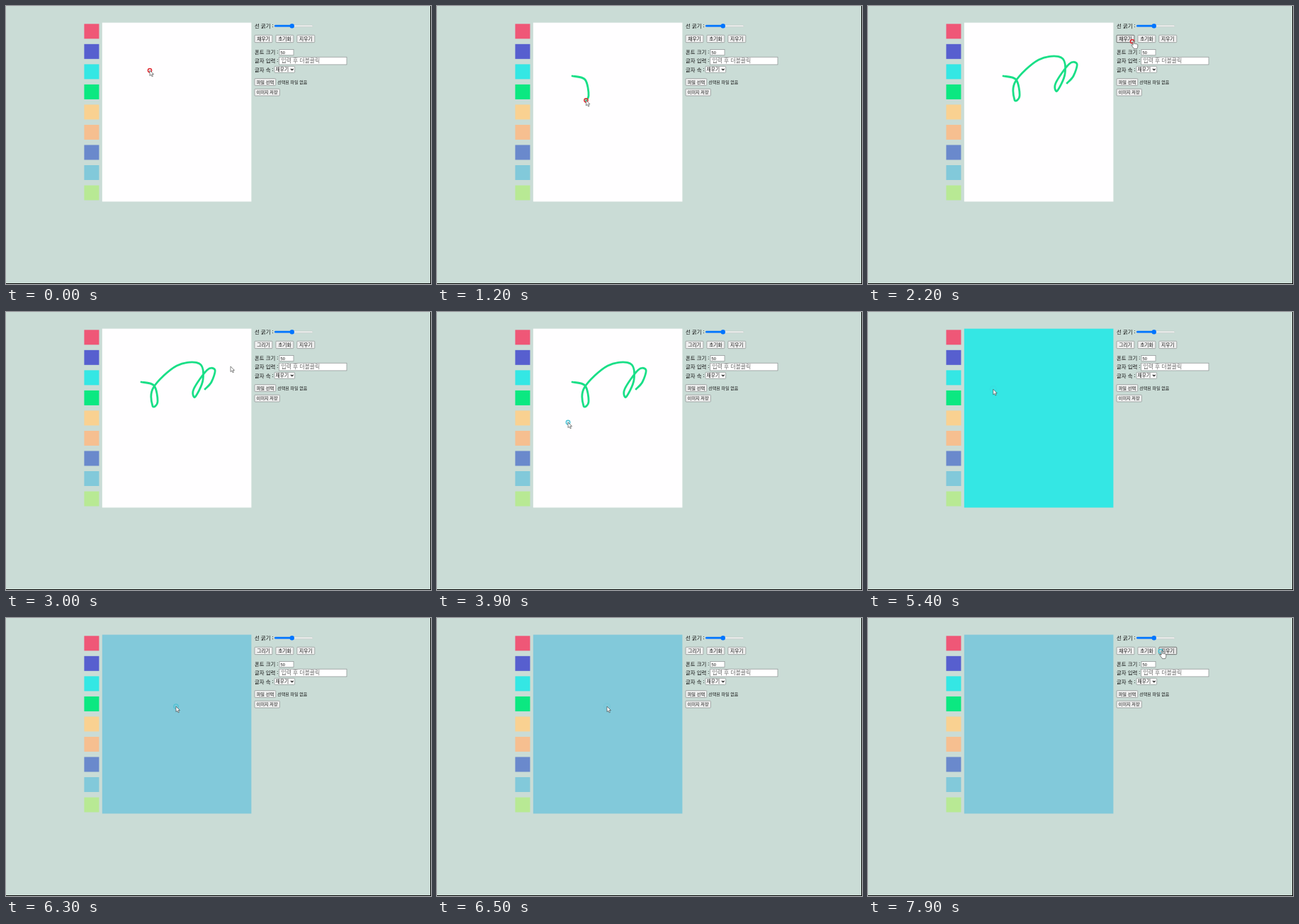
An HTML page for the animation above (8000 ms loop, 600 by 393 pixels).

```html
<!DOCTYPE html>
<html lang="ko">
<meta charset="utf-8">
<title>그림판</title>
<style>
html, body { margin: 0; width: 100%; height: 100%; overflow: hidden; background: #000 }
svg { display: block; width: 600px; height: 393px }
text { font-family: "Noto Sans CJK KR", "Noto Sans CJK", sans-serif; font-weight: 300; fill: #111; white-space: pre }
.box { fill: #fff; stroke: #8b9090; stroke-width: .7 }
.button { fill: #efefef; stroke: #8b9090; stroke-width: .7 }
.button.hover { fill: #e6e6e6; stroke: #444 }
.cursor { fill: #fff; stroke: #333; stroke-width: .6; stroke-linejoin: round }
</style>
<svg id="stage" viewBox="0 0 600 393">
  <rect width="599" height="392" fill="#cadcd6"/>
  <rect id="paper" x="135.8" y="23.6" width="210.6" height="252.9"/>
  <path id="line" fill="none" stroke="#19df87" stroke-width="2.8" stroke-linecap="round"/>
  <g id="ui"></g>
  <circle id="ring"/>
  <g id="pointer">
    <path id="arrow" class="cursor" d="M0 0V7.6L1.8 6L3.1 8.8L4.4 8.2L3.2 5.5H5.5Z"/>
    <path id="hand" class="cursor" d="M1.1 0C1.1-1.3 2.8-1.3 2.8 0V3.4C3.4 2.8 4.2 3 4.4 3.6C5.2 3.2 6 3.4 6.2 4.1C7 3.7 7.8 4.2 7.8 5.1V7.2C7.8 8.9 6.9 9.3 6.8 10.4H2.4C2 8.9-.3 7.2-.8 5.6C-1 4.6 0 4.3 1.1 5.4Z"/>
  </g>
</svg>
<script>
const $ = id => document.getElementById(id);

function add(tag, attrs, content = '') {
  const el = document.createElementNS('http://www.w3.org/2000/svg', tag);
  for (const key in attrs) el.setAttribute(key, attrs[key]);
  el.textContent = content;
  return $('ui').appendChild(el);
}
const rect = (x, y, width, height, attrs) => add('rect', { x, y, width, height, ...attrs });
const label = (x, y, size, content, attrs) => add('text', { x, y, 'font-size': size, ...attrs }, content);

function button(x, y, width, height, size, content) {
  const box = rect(x, y, width, height, { class: 'button', rx: 1 });
  const text = label(x + width / 2, y + height / 2 + size * .36, size, content, { 'text-anchor': 'middle' });
  return { x, width, box, text };
}

// Palette
const colors = ['#ef5777', '#575fcf', '#34e7e4', '#0be881', '#f9d191', '#f6bf90', '#6a89cc', '#82c9da', '#b8e994'];
const swatchSize = 21, swatchLeft = 110.4, swatchTop = 25.3, swatchStep = 28.53;
colors.forEach((fill, i) => rect(swatchLeft, swatchTop + i * swatchStep, swatchSize, swatchSize, { fill }));

// Controls
const left = 351;
['선 굵기 :', '폰트 크기 :', '글자 입력 :', '글자 속 :'].forEach((name, i) =>
  label(left, i ? 55.3 + i * 12.4 : 31, 7.4, name));
rect(379, 27, 54, 2.4, { rx: 1.2, fill: '#efefef', stroke: '#b4bcb9', 'stroke-width': .4 });
rect(379, 26.8, 25, 2.8, { rx: 1.4, fill: '#0075ff' });
add('circle', { cx: 403.8, cy: 28.2, r: 3.2, fill: '#0075ff' });
const tools = ['채우기', '초기화', '지우기'].map((name, i) => button(left + i * 29.9, 41.2, 25, 10.4, 6.7, name));
rect(386, 61.6, 20, 8, { class: 'box' });
label(387.5, 67.8, 5.8, '50', { style: 'font-family: "Liberation Sans", sans-serif' });
rect(385.7, 72.2, 95.3, 10.7, { class: 'box' });
label(388.6, 80.4, 7.8, '입력 후 더블클릭', { style: 'fill: #666' });
rect(379, 85.3, 28.6, 8.8, { class: 'box', rx: .8 });
label(380.6, 92.2, 6.7, '채우기');
add('path', { d: 'M402 88.8L403.8 90.6L405.6 88.8', fill: 'none', stroke: '#222', 'stroke-width': 1.3 });
button(left, 102.6, 29.8, 9.8, 6.2, '파일 선택');
label(383.2, 109.8, 6, '선택된 파일 없음');
button(left, 117.2, 35.4, 9.8, 6.1, '이미지 저장');

// Smooth curve through a few points
function spline(points) {
  const at = i => points[Math.min(points.length - 1, Math.max(0, i))];
  const handle = (i, side) => at(i).map((v, k) => v + side * (at(i + 1)[k] - at(i - 1)[k]) / 6);
  return 'M' + points[0] + points.slice(1).map((p, i) => `C${handle(i, 1)} ${handle(i + 1, -1)} ${p}`).join('');
}
const line = $('line');
line.setAttribute('d', spline([[191, 99], [209, 104], [214, 127], [207, 133], [208, 107], [241, 76], [273, 73],
  [278, 96], [267, 120], [265, 109], [284, 82], [295, 82], [290, 99], [281, 109]]));
const length = line.getTotalLength();

// Mouse presses; a drag follows the line
const press = (time, x, y, hold = 100) => ({ time, x, y, up: time + hold });
const pick = (time, i) => press(time, 114, swatchTop + i * swatchStep + 6.6);
const drag = press(1100, 191, 99, 600);
const presses = [
  press(0, 203, 91), pick(500, 3), drag, press(2200, 373, 50),
  pick(3350, 5), press(3800, 185, 156), pick(4750, 2), press(5050, 184, 95),
  pick(5800, 7), press(6150, 240, 125), press(7300, 369, 47), press(7800, 413, 47)
];

const swatchAt = (x, y) => x > swatchLeft && x < swatchLeft + swatchSize
  && (y - swatchTop) % swatchStep < swatchSize ? Math.floor((y - swatchTop) / swatchStep) : -1;
const toolAt = (x, y) => tools.findIndex(b => x > b.x && x < b.x + b.width && y > 41 && y < 52);

function stateAt(t) {
  const state = { paper: '#fffeff', filled: false, filling: false };
  let color;
  for (const { x, y, up } of presses) {
    if (up >= t) break;
    const swatch = swatchAt(x, y), tool = toolAt(x, y);
    if (swatch >= 0) color = colors[swatch];
    else if (tool === 0) state.filling = !state.filling;
    else if (tool < 0 && state.filling) Object.assign(state, { paper: color, filled: true });
  }
  return state;
}

function pointerAt(t, last, drawn) {
  if (last === drag && t <= drag.up) return line.getPointAtLength(drawn * length);
  const next = presses[presses.indexOf(last) + 1] || last;
  const from = last === drag ? line.getPointAtLength(length) : last;
  const travel = Math.min(500, next.time - last.up - 50);
  const k = next === last ? 0 : Math.max(0, 1 - (next.time - t) / travel);
  const ease = k * k * (3 - 2 * k);
  return { x: from.x + (next.x - from.x) * ease, y: from.y + (next.y - from.y) * ease };
}

function showRing(age, x, y) {
  const held = age < 0;
  const attrs = {
    cx: x, cy: y,
    r: held ? 2.6 : 2.9 + age / 150,
    fill: held ? '#fff4' : '#54cbdc55',
    stroke: held ? '#df2930' : '#42bfd3',
    'stroke-width': held ? 1.5 : 1.1,
    opacity: held ? 1 : Math.max(0, 1 - age / 300)
  };
  for (const key in attrs) $('ring').setAttribute(key, attrs[key]);
}

function render(now) {
  const t = Math.floor(now % 8000 / 100) * 100;
  const drawn = Math.min(1, Math.max(0, (t - drag.time) / (drag.up - drag.time)));
  const last = presses.filter(p => p.time <= t).pop();
  const { x, y } = pointerAt(t, last, drawn);
  const { paper, filled, filling } = stateAt(t);

  $('paper').setAttribute('fill', paper);
  line.style.strokeDasharray = `${drawn * length} 999`;
  line.style.display = drawn > 0 && !filled ? '' : 'none';
  tools[0].text.textContent = filling ? '그리기' : '채우기';

  const over = toolAt(x, y), hand = over >= 0 || swatchAt(x, y) >= 0;
  tools.forEach((tool, i) => tool.box.classList.toggle('hover', i === over));
  $('hand').style.display = hand ? '' : 'none';
  $('arrow').style.display = hand ? 'none' : '';
  $('pointer').setAttribute('transform', `translate(${x} ${y})`);
  showRing(t - last.up, x, y);
}

const start = performance.now();
function frame() {
  render(performance.now() - start);
  requestAnimationFrame(frame);
}
frame();
</script>
</html>
```
